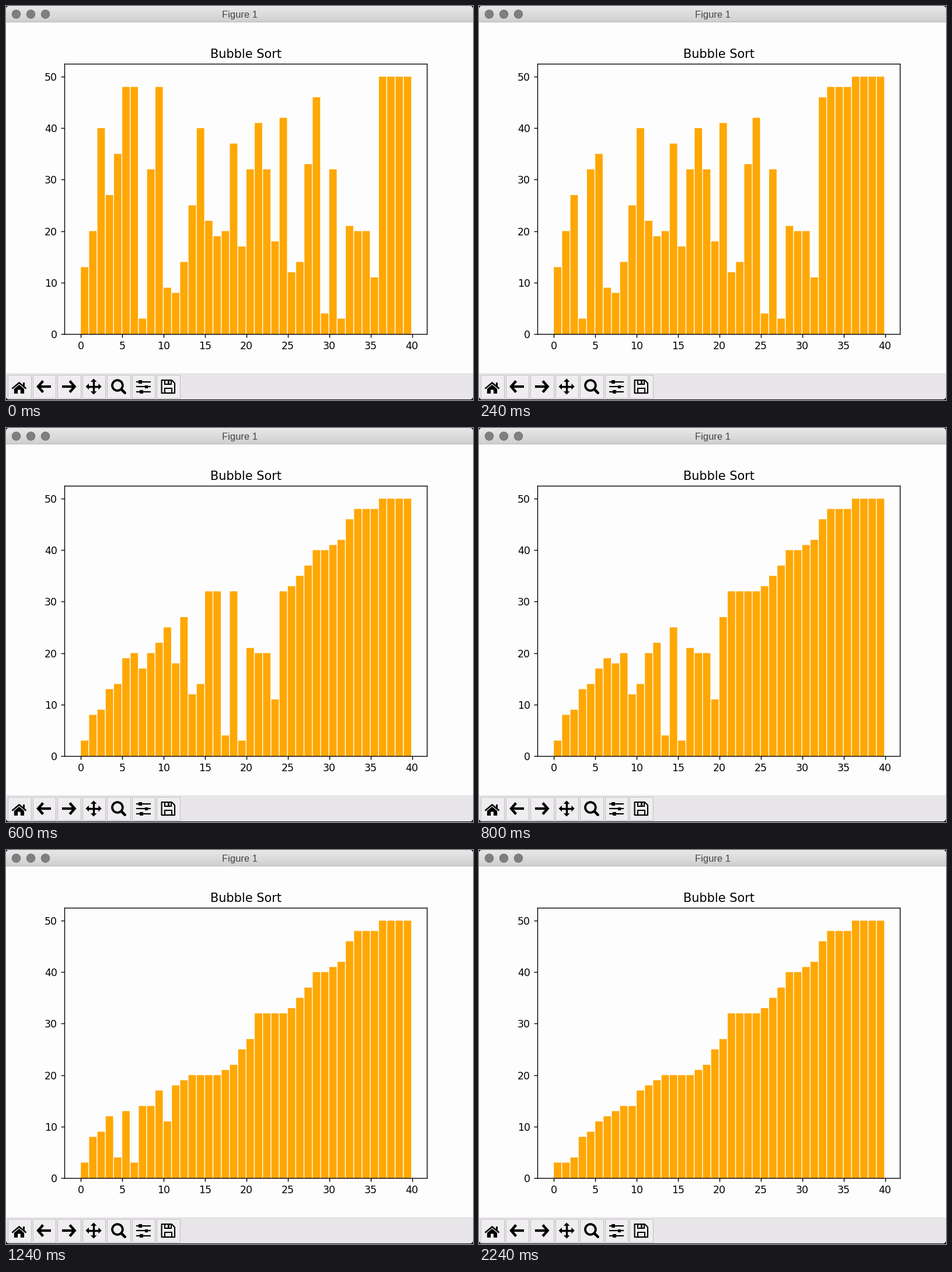
Animation, 800 px wide and 675 px high, one loop 2.4 s. Source, as a matplotlib script:

```python
import numpy as np
import matplotlib.pyplot as plt
from matplotlib.animation import FuncAnimation
from matplotlib.patches import Circle, FancyBboxPatch, Polygon, Rectangle

W, H, DPI = 800, 675, 125
PT = 72 / DPI
FRAMES, STEP = 60, 40
PAUSES = (1, 4, 9, 19, 24, 29, 34)  # ticks on which the sort does not advance
PASSES = 30
START = [13, 20, 40, 27, 35, 48, 48, 3, 32, 48, 9, 8, 14, 25, 40, 22, 19, 20, 37, 17,
         32, 41, 32, 18, 42, 12, 14, 33, 46, 4, 32, 3, 21, 20, 20, 11, 50, 50, 50, 50]
PAPER, INK, ORANGE = "#fefdfe", "black", "#ffa702"

plt.rcParams["font.family"] = "DejaVu Sans"
plt.rcParams["toolbar"] = "None"
fig = plt.figure(figsize=(W / DPI, H / DPI), dpi=DPI, facecolor="#0c0a0c")

# Window chrome, in pixels with y pointing down
ui = fig.add_axes([0, 0, 1, 1])
ui.axis("off")
window = FancyBboxPatch((6, 6), W - 12, H - 13, boxstyle="round,pad=6,rounding_size=6",
                        fc=PAPER, ec="none")
ui.add_patch(window)


def rect(x, y, w, h, color=INK, **kw):
    return ui.add_patch(Rectangle((x, y), w, h, **{"fc": color, "ec": "none", **kw}))


def poly(points, color=INK, **kw):
    ui.add_patch(Polygon(points, **{"fc": color, "ec": "none", **kw}))


def line(points, width, cap="butt", join="miter"):
    x, y = zip(*points)
    ui.plot(x, y, color=INK, lw=width * PT, solid_capstyle=cap, solid_joinstyle=join)


def frame(x, y, w, h, width=2):
    rect(x, y, w, h, "none", ec=INK, lw=width * PT)


def home(x, y):
    line([(x - 12, y + 3.5), (x, y - 6.5), (x + 12, y + 3.5)], 2.6)
    rect(x + 6.3, y - 7.5, 3.6, 8)
    poly([(x - 8.6, y + 4), (x, y - 3.2), (x + 8.6, y + 4), (x + 8.6, y + 12),
          (x + 2.4, y + 12), (x + 2.4, y + 5.5), (x - 2.4, y + 5.5),
          (x - 2.4, y + 12), (x - 8.6, y + 12)])


def arrow(x, y, side):
    line([(x + 1.6 * side, y - 9.6), (x + 10 * side, y), (x + 1.6 * side, y + 9.6)], 4.4)
    line([(x - 11.5 * side, y), (x + 9 * side, y)], 4.2)


def pan(x, y):
    line([(x - 10, y), (x + 10, y)], 3.4)
    line([(x, y - 10), (x, y + 10)], 3.4)
    for dx, dy in ((1, 0), (-1, 0), (0, 1), (0, -1)):
        poly([(x + 13.6 * dx, y + 13.6 * dy),
              (x + 8.2 * dx + 5.3 * dy, y + 8.2 * dy + 5.3 * dx),
              (x + 8.2 * dx - 5.3 * dy, y + 8.2 * dy - 5.3 * dx)])


def zoom(x, y):
    ui.add_patch(Circle((x - 1.8, y - 2), 8.9, fc="none", ec=INK, lw=3.8 * PT))
    line([(x + 4.8, y + 4.6), (x + 11, y + 10.8)], 4.6, "round")


def sliders(x, y):
    for dy, knob in ((-8.2, -5), (0.4, 5.2), (9, -3)):
        line([(x - 12.5, y + dy), (x + 12.5, y + dy)], 2.1)
        rect(x + knob - 2.8, y + dy - 2.9, 5.6, 5.8)


def save(x, y):
    poly([(x - 11.2, y - 11), (x + 6, y - 11), (x + 11.2, y - 5.8),
          (x + 11.2, y + 11.2), (x - 11.2, y + 11.2)], "none", ec=INK, lw=2.1 * PT,
         joinstyle="round")
    frame(x - 6.2, y + 2.8, 12.4, 8.4)
    frame(x - 6.2, y - 11, 11, 7.2)
    rect(x - 0.4, y - 10, 3, 5)


shade = np.linspace(0.91, 0.815, 54)[:, None, None] * np.ones((1, 2, 3))
bar_img = ui.imshow(shade, extent=(0, W, 27, 0), aspect="auto", zorder=2)
bar_img.set_clip_path(window)
rect(0, 26.5, W, 1, "#b9b7b9", zorder=3)
for cx in (17.5, 42.5, 67.5):
    ui.add_patch(Circle((cx, 14), 7.2, fc="#807e80", ec="#6c6a6c", lw=0.9 * PT, zorder=3))
ui.text(400, 20, "Figure 1", family="Liberation Sans", size=16.5 * PT, color="#474547",
        ha="center", va="baseline", zorder=3)

rect(0, 628.5, W, 46, "#e8e6e8").set_clip_path(window)
tools = (home, lambda x, y: arrow(x, y, -1), lambda x, y: arrow(x, y, 1),
         pan, zoom, sliders, save)
for i, draw in enumerate(tools):
    cx = 22.5 + 42.55 * i
    rect(cx - 19.5, 631.5, 39.5, 40, "#efedef", ec="#bfbdbf", lw=1 * PT)
    draw(cx, 652)
ui.set_xlim(0, W)
ui.set_ylim(H, 0)

# Chart
ax = fig.add_axes([100 / W, (H - 562) / H, 621 / W, 463 / H], facecolor=PAPER)
bars = ax.bar(range(len(START)), START, width=0.9, align="edge", color=ORANGE, snap=False)
ax.set_xlim(-1.99, 41.79)
ax.set_ylim(0, 52.5)
ax.set_xticks(range(0, 41, 5))
ax.set_yticks(range(0, 51, 10))
ax.set_title("Bubble Sort")


def bubble_pass(values):
    out = list(values)
    for j in range(len(out) - 1):
        if out[j] > out[j + 1]:
            out[j], out[j + 1] = out[j + 1], out[j]
    return out


history = [START]
for _ in range(PASSES):
    history.append(bubble_pass(history[-1]))


def update(tick):
    done = min(PASSES, tick - sum(p <= tick for p in PAUSES))
    for bar, value in zip(bars, history[done]):
        bar.set_height(value)
    return bars


anim = FuncAnimation(fig, update, frames=FRAMES, interval=STEP, repeat=True, repeat_delay=0)
plt.show()
```
